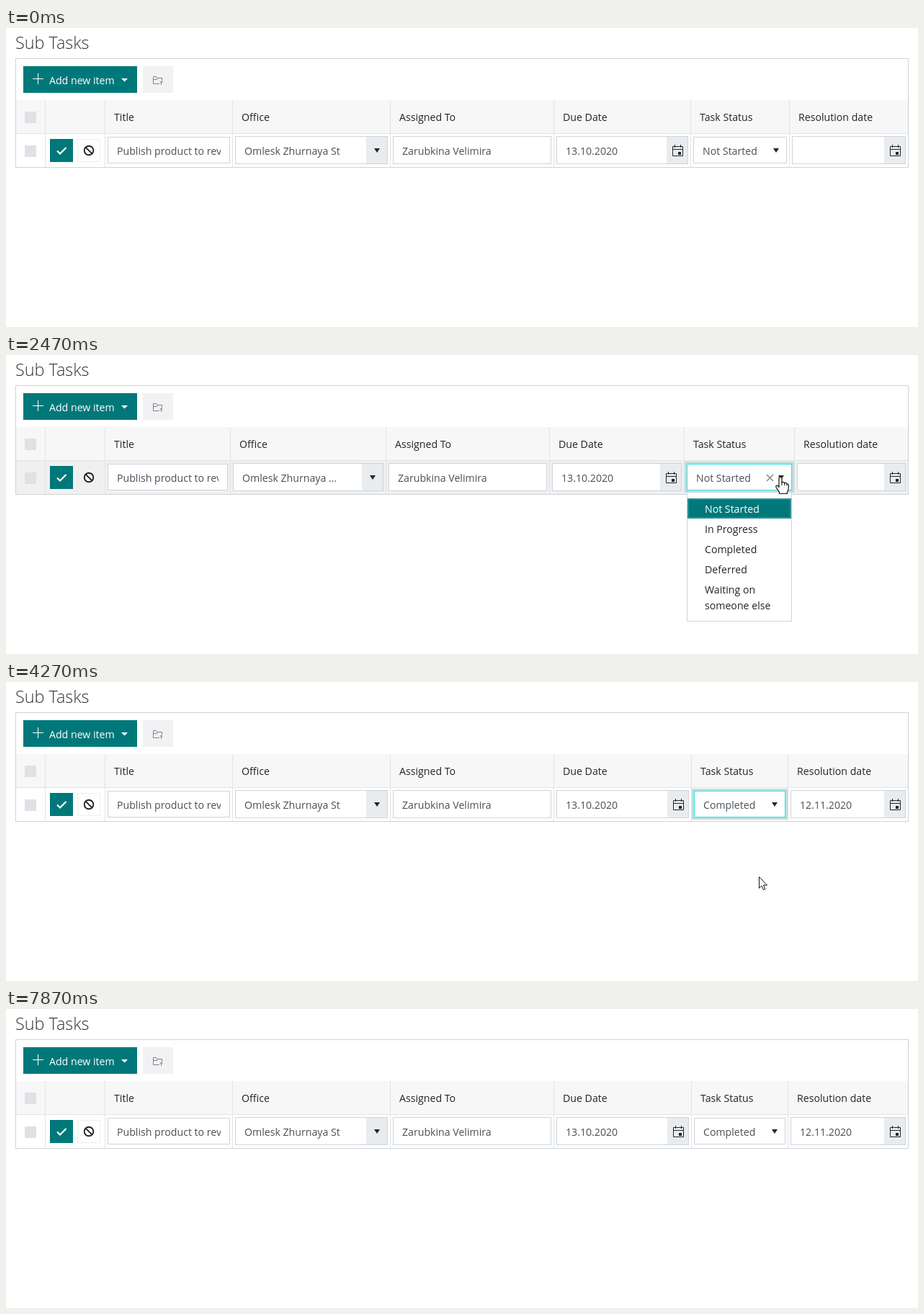
Write an HTML page that moves like this. It is 1266 by 415 pixels and loops after 7940 ms.

```html
<!DOCTYPE html>
<html lang="en">
<head>
<meta charset="utf-8">
<title>Sub Tasks</title>
<style>
  html, body { margin: 0; height: 100%; overflow: hidden; background: #fff; }
  svg { display: block; }
  #stage { width: 100vw; height: 100vh; }
  text { font: 14.15px "Open Sans", "Noto Sans", sans-serif; white-space: pre; }
  .heading { font-size: 23.4px; font-weight: 300; }
</style>
</head>
<body>
<svg id="stage" viewBox="0 0 1266 415"></svg>
<script>
const LOOP = 7940, FPS = 15;
const TEAL = '#00787a', INK = '#212529', SOFT = '#495057', LINE = '#ced4da', GRID = '#e1e4e7';
const HEADERS = ['Title', 'Office', 'Assigned To', 'Due Date', 'Task Status', 'Resolution date'];
const COLUMNS = {
  idle: [137, 314, 533, 760, 950, 1087, 1252],
  hover: [137, 311, 527, 754, 941, 1094, 1252],
  done: [137, 314, 533, 760, 951, 1085, 1252]
};
// Pointer path: step, x, y
const PATH = [
  [5, 1112, 418], [17, 1068, 203], [18, 1070, 189], [19, 1073, 176], [20, 1075, 172],
  [21, 1075, 172], [22, 1075, 169], [47, 1075, 169], [56, 1045, 270], [69, 1045, 270],
  [77, 1231, 170], [89, 1231, 170], [94, 1268, 246]
];

const clamp = v => Math.max(0, Math.min(1, v));
const rect = (x, y, w, h, fill, extra = '') =>
  `<rect x="${x}" y="${y}" width="${w}" height="${h}" fill="${fill}" ${extra}/>`;
const box = (x, y, w, h, fill, stroke) =>
  rect(x + .5, y + .5, w - 1, h - 1, fill, `stroke="${stroke}"`);
const path = (d, stroke, width = 1, fill = 'none') =>
  `<path d="${d}" stroke="${stroke}" stroke-width="${width}" fill="${fill}"/>`;
const text = (x, y, s, fill = INK, cls = '') =>
  `<text x="${x}" y="${y}" fill="${fill}" class="${cls}">${s}</text>`;
const at = (x, y, content) => `<g transform="translate(${x} ${y})">${content}</g>`;
const clip = (x, y, w, h, content) =>
  `<svg x="${x}" y="${y}" width="${w}" height="${h}" viewBox="${x} ${y} ${w} ${h}">${content}</svg>`;
const caret = x => path(`M${x - 4} 167h8l-4 6z`, 'none', 0, INK);

function pointerAt(n) {
  if (n < 6 || n >= 94) return null;
  const i = PATH.findIndex(p => p[0] > n) - 1;
  const [n0, x0, y0] = PATH[i], [n1, x1, y1] = PATH[i + 1];
  const u = (n - n0) / (n1 - n0), e = u * u * (3 - 2 * u);
  return { x: Math.round(x0 + (x1 - x0) * e), y: Math.round(y0 + (y1 - y0) * e) };
}

const calendar = x => at(x - 7, 162,
  path('M.5 2.5h14v13h-14zM.5 6.5h14M3.5 0v4M11.5 0v4', INK) + rect(8, 10, 4, 4, INK));

function field(x, right, value, kind) {
  const button = kind === 'combo' || kind === 'date';
  const inset = kind === 'text' || kind === 'select' ? 1 : 0;
  const room = right - x - 26 - (button ? 22 : 0);
  let out = box(x, 150 + inset, right - x, 39 - inset * 2, '#fff', LINE) +
    clip(x + 13, 152, room, 35, text(x + 13, 176, value, SOFT));
  if (button) out += rect(right - 30, 151, 29, 37, '#e9ecef') +
    path(`M${right - .5} 150v39`, LINE);
  if (kind === 'combo' || kind === 'select') out += caret(right - 15);
  if (kind === 'date') out += calendar(right - 15);
  return out;
}

function toolbar() {
  return text(13, 29, 'Sub Tasks', '#333', 'heading') +
    rect(24, 53, 158, 37, TEAL) +
    path('M37 70.5h15M44.5 63v15', '#fff') +
    text(60, 77.5, 'Add new item', '#fff') +
    path('M160 70h9l-4.5 4.5z', 'none', 0, '#fff') +
    rect(190, 53, 42, 37, '#f2f2f4') +
    path('M213 77.5h-8.5v-10h4l1.5 2h6.5v4M204.5 71.5h5l1-2M215.5 79v-5M213.5 76l2-2 2 2', '#666', .8);
}

function popup(open, hovered) {
  const labels = [['Not Started', 219], ['In Progress', 247], ['Completed', 275],
    ['Deferred', 303], ['Waiting on', 331], ['someone else', 353]];
  const list = box(945, 190, 146, 180, '#fff', LINE) +
    (hovered ? rect(946, 199 + 28 * hovered, 144, 28, '#f5f9fa') : '') +
    rect(947, 200, 142, 26, TEAL, 'stroke="#2f8f91" stroke-width="2"') +
    labels.map(([s, y], i) => text(970, y, s, i ? INK : '#fff')).join('');
  return clip(945, 190, 146, 181, at(0, -180 * (1 - open), list));
}

function cursor({ x, y }, hand) {
  const arrow = path('M.5 .5V16.2L4 12.9 6.4 18.4 8.8 17.3 6.5 12H11.5Z', '#111', 1, '#fff');
  const pointing = path('M-2 1.8C-2-.2 2-.2 2 1.8V8q2.5-1.5 3.5.6 2.5-1 3.5 1.2 2.3-.4 2.3 2V16' +
    'q0 3-2 5.5v2H-1.5v-2L-6 14.5q-.8-3.2 2-2.2l2 2z', '#111', 1.2, '#fff') +
    path('M2 8v4M5.5 8.8V12M9 10v2.5', '#111');
  return at(x, y, hand ? pointing : arrow);
}

function scene(n) {
  const p = pointerAt(n);
  const rowHover = p && p.y > 147 && p.y < 194;
  const selectHover = p && p.y < 189 && p.x < 1092;
  const done = n >= 62;
  const cols = COLUMNS[done ? 'done' : selectHover ? 'hover' : 'idle'];
  const open = done ? clamp((64 - n) / 3) : 1 - (1 - clamp((n - 32) / 5)) ** 2;
  const focus = done ? clamp((118 - n) / 2) : clamp((n - 32) / 4);
  const cells = [
    ['Publish product to review', 'text'],
    [selectHover ? 'Omlesk Zhurnaya ...' : 'Omlesk Zhurnaya St', 'combo'],
    ['Zarubkina Velimira', 'person'],
    ['13.10.2020', 'date'],
    [done ? 'Completed' : 'Not Started', 'select'],
    [done ? '12.11.2020' : '', 'date']
  ];

  let out = toolbar() + rect(14, 100, 1238, 46, '#f7f7f7');
  if (rowHover) out += rect(14, 147, 1238, 46, '#f0f0f0');
  out += path('M14 146.5h1238', GRID);
  for (const x of [54, ...cols.slice(0, 6)]) out += path(`M${x + .5} 100v93`, GRID);
  out += box(13, 42, 1240, 152, 'none', LINE);
  out += rect(26, 116, 16, 16, '#dee2e6') + rect(26, 163, 16, 16, '#dee2e6');
  out += rect(61, 154, 32, 32, TEAL) + path('M71 170.5l4 4 8.5-8.5', '#fff', 2.2);
  out += box(99, 154, 32, 32, rowHover ? '#f0f0f0' : '#fff', '#eeeeef') +
    `<circle cx="115" cy="170" r="6.3" fill="none" stroke="${INK}" stroke-width="1.9"/>` +
    path('M110.6 165.6l8.8 8.8', INK, 1.9);

  HEADERS.forEach((s, i) => out += text(cols[i] + 13, 129, s));
  cells.forEach(([value, kind], i) => out += field(cols[i] + 4, cols[i + 1] - 3, value, kind));

  const left = cols[4] + 4, right = cols[5] - 3;
  if (selectHover) out += path(`M${right - 35} 166l9 9m0-9l-9 9`, '#8a8f94', 1.7);
  if (focus) {
    out += `<g opacity="${focus}">` +
      rect(left - 1.5, 149.5, right - left + 3, 40, 'none', 'stroke="#bfdddd" stroke-width="3"') +
      box(left, 151, right - left, 37, 'none', '#2fe3e6') + '</g>';
  }
  if (open) {
    const item = p ? Math.floor((p.y - 199) / 28) : 0;
    out += popup(open, item > 0 ? item : 0);
  }
  if (p) out += cursor(p, n >= 19 && n < 63 || n >= 76 && n < 91);
  return out;
}

const stage = document.getElementById('stage');
let shown = -1;
function tick() {
  const n = Math.floor((performance.now() % LOOP) * FPS / 1000 + .05);
  if (n !== shown) stage.innerHTML = scene(shown = n);
  requestAnimationFrame(tick);
}
tick();
</script>
</body>
</html>
```
